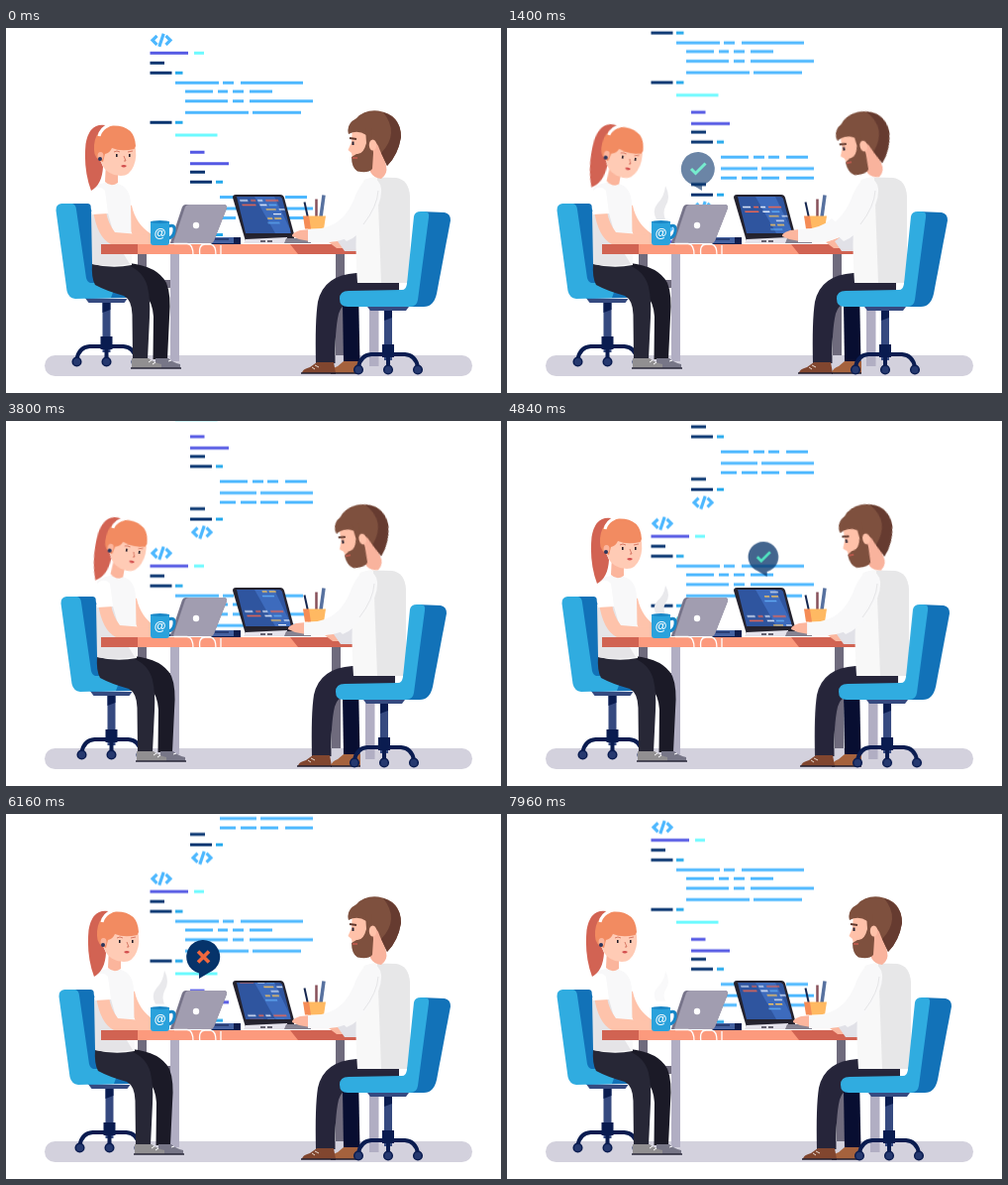
An HTML page without scripts that plays this animation: 500x368 px, repeating every 8000 ms.

```html
<!DOCTYPE html>
<html lang="en">
<head>
<meta charset="utf-8">
<title>Pair programming</title>
<style>
html, body { margin: 0; width: 100%; height: 100%; overflow: hidden; background: #fff; }
svg { display: block; width: 100vw; height: 100vh; }
.code { animation: scroll 8s linear infinite; }
.screen { animation: lines 8s linear infinite; }
.girl { animation: roll 8s ease-in-out infinite; }
.girl-head { transform-origin: 105px 158px; animation: nod 8s ease-in-out infinite; }
.man { animation: lean 8s ease-in-out infinite; }
.man-head { transform-origin: 378px 150px; animation: look 8s ease-in-out infinite; }
.hand { animation: type 8s ease-in-out infinite; }
.steam { transform-origin: 155px 194px; animation: steam 4s linear infinite; }
.pop { animation: pop 8s linear infinite; }
@keyframes scroll { to { transform: translateY(-230.5px); } }
@keyframes lines { to { transform: translateY(38px); } }
@keyframes roll {
  0%, 21.5% { transform: none; }
  37%, 63.5% { transform: translateX(5px); }
  94%, 100% { transform: none; }
}
@keyframes nod {
  0%, 1% { transform: none; }
  13%, 48% { transform: rotate(10deg); }
  58%, 100% { transform: none; }
}
@keyframes lean {
  0%, 11% { transform: none; }
  17%, 53% { transform: translateX(-4px); }
  68%, 100% { transform: none; }
}
@keyframes look {
  0%, 11% { transform: none; }
  17%, 58% { transform: translate(.7px, -1.5px) rotate(-13deg); }
  69%, 100% { transform: none; }
}
@keyframes type {
  0%, 10%, 24%, 47.5%, 60.5%, 77%, 93%, 100% { transform: none; }
  5%, 55%, 68%, 86% { transform: translateX(-4px); }
  17.5% { transform: translateX(-7px); }
  30%, 38% { transform: translateX(-3px); }
}
@keyframes steam {
  0%, 5% { opacity: 0; transform: translateY(4px) scaleY(.7); }
  16% { opacity: 1; }
  35% { transform: none; }
  62% { opacity: 1; transform: translateY(-2px); }
  73%, 96% { opacity: 0; transform: translateY(-4px) scaleY(.9); }
  99% { opacity: .3; }
  100% { opacity: 0; transform: translateY(-4px) scaleY(.9); }
}
@keyframes pop {
  0% { opacity: 0; transform: scale(.6); }
  3%, 11.5% { opacity: 1; transform: none; }
  14%, 100% { opacity: 0; transform: none; }
}
</style>
</head>
<body>
<svg viewBox="0 0 500 368" fill="none">
<defs>
  <clipPath id="air"><path d="M0 0H500V217H0Z"/></clipPath>
  <clipPath id="glass"><path d="M233 170H276Q278 170 279 172L288 207H242Z"/></clipPath>
  <g id="tag" stroke="#4db8ff" stroke-width="3.200">
    <path d="M-4.500 -4.500L-9 0L-4.500 4.500M4.500 -4.500L9 0L4.500 4.500M2.200 -6.500L-2.200 6.500"/>
  </g>
  <g id="block" stroke-width="3">
    <use href="#tag" x="157" y="12.300"/>
    <use href="#tag" x="198" y="221.700"/>
    <path stroke="#5458e4" d="M145.500 25.300H184M186 125.300H200.500M186 136.800H225"/>
    <path stroke="#6cfaff" d="M190 25.300H200M171 108H213.500"/>
    <path stroke="#06336f" d="M145.500 35.200H160M145.500 45.200H167.500M145.500 95.300H167.500M186 145.200H201M186 155.200H208M186 198H201M186 208.500H208"/>
    <path stroke="#25a9ec" d="M171 45.200H178.500M171 95.300H178.500M212 155.200H219M212 208.500H219"/>
    <path stroke="#4db8ff" d="M171 55.200H215M219 55.200H230M237 55.200H300M181 64H209M214 64H224M229 64H240M246 64H269M181 73.700H224M229 73.700H240M246 73.700H310M181 85.300H245M249 85.300H298M216 170.500H244M249 170.500H260M264 170.500H275M282 170.500H304M216 182H253M257 182H310M216 191.600H232M237 191.600H253M257 191.600H275M282 191.600H310"/>
  </g>
  <g id="rows" stroke-width="1.300">
    <path stroke="#e6eefc" d="M236 174H244M254 174H259M255 178.500H262M273 183H279M266 187.500H274"/>
    <path stroke="#f0674f" d="M247 174H252M262 174H275M237 178.500H251"/>
    <path stroke="#f6c35c" d="M260 183H270M259 192H264M266 192H273"/>
    <path stroke="#5fa9f2" d="M264 178.500H272M258 196.500H270"/>
  </g>
  <path id="balloon" fill="#06336a" d="M-4 16.500A17 17 0 1 1 6 16L-4 22Z"/>
  <g id="wrong"><use href="#balloon"/><path stroke="#f2683d" stroke-width="3.600" d="M-5 -5.500L6 5.500M6 -5.500L-5 5.500"/></g>
  <g id="right"><use href="#balloon" transform="scale(-1 1)"/><path stroke="#19dfae" stroke-width="3" d="M-7 0L-2.500 4.500L7.500 -5.500"/></g>
  <g id="base">
    <path fill="#364a80" d="M-21 0H21L18 4H-18ZM-4 4H4V54H-4Z"/>
    <path fill="#0a1c50" d="M-4 4H4V11L-4 14Z"/>
    <path stroke="#0a1c50" stroke-width="4" d="M-30 61Q-28 49 -17 48H17Q28 49 30 61M0 45V62"/>
    <path fill="#0a1c50" d="M-6 38H6V51H-6Z"/>
    <g fill="#26396f" stroke="#0a1c50" stroke-width="1.500"><circle cx="-30" cy="63.500" r="4.300"/><circle cy="63.500" r="4.300"/><circle cx="30" cy="63.500" r="4.300"/></g>
  </g>
</defs>

<rect x="39" y="330" width="432" height="21" rx="10.500" fill="#d3d1dd"/>

<g clip-path="url(#air)">
  <g class="code"><use href="#block"/><use href="#block" y="230.500"/></g>
</g>

<!-- table legs; the right end follows the man -->
<path fill="#6f6b7d" d="M133 228H142V254H167V262H142V330H133Z"/>
<path fill="#b1aec3" d="M166 228H175V336H166Z"/>
<g class="man">
  <path fill="#6f6b7d" d="M333 228H342V330H333Z"/>
  <path fill="#b1aec3" d="M367 228H376.500V341H367Z"/>
</g>

<g class="girl">
  <use href="#base" transform="translate(101.500 273)"/>
  <path fill="#1272b8" d="M66 177H83Q87 178 87 183L90 246L123 256V272L80 273Z"/>
  <path fill="#30ace0" d="M50.500 184Q50 178 56 177H67Q70.500 178 71 183L81 252Q82 256 85 257H104Q110 258 109 264L106 272L70 273Q63 272 61.500 265Z"/>
  <path fill="#1b1a27" d="M100 237H124Q153 240 162 257Q167 269 165 292L163 334H148.500L149 291Q148 276 140 268Z"/>
  <path fill="#272736" d="M87 237H118Q139 244 143 261Q146 274 145 292L143 334H128L127.500 289Q127 274 119 270Q101 265 90 259Q86 252 87 237Z"/>
  <path fill="#777687" d="M151 333H164Q168 337 176 339V343H151Z"/>
  <path fill="#918f91" d="M127 333H144Q149 337 157 339V343H127Z"/>
  <path stroke="#282738" stroke-width="1.500" d="M126 343H158M156 343H177"/>
  <path stroke="#fff" d="M144 337L147 335M148 339L151 337M164 336L167 335"/>
  <path fill="#fec3ab" d="M121 176L127 179Q131 198 147 208V217H134Q121 201 119 183Z"/>
  <path fill="#f8f8f9" d="M87 162Q97 153 113 157Q125 160 126 177L127 239Q107 243 87 238Z"/>
  <path fill="#e5e4e7" d="M86 185L103 187L111 215L125 238Q103 241 87 238Z"/>
  <path fill="#fec3ab" d="M88 184L101 185Q103 197 110 206L147 209V218H106Q92 211 88 184Z"/>
  <path fill="#fff" d="M86 165Q94 157 100 164L103 187L87 188Q84 175 86 165Z"/>
  <g class="girl-head">
    <path fill="#d26353" d="M101 98Q84 95 80.500 117Q78 143 86 164Q97 158 98 140Q91 125 96 109Z"/>
    <path fill="#fbb59c" d="M101 135L113 145V156Q106 161 100 155Z"/>
    <path fill="#ffcbb5" d="M93 117Q112 99 130 117Q133 129 129 139Q125 149 116 149Q101 148 97 137Q91 130 93 117Z"/>
    <path fill="#f28b61" d="M89 123Q88 101 108 98.500Q130 98 131 119L129.500 122Q116 125 107 121Q105 126 100 127L98 135Q89 132 89 123Z"/>
    <path stroke="#fff" stroke-width="3" d="M94 109Q96 101 104 98"/>
    <ellipse cx="95.500" cy="129" rx="3" ry="4" fill="#fbb59c"/>
    <circle cx="95" cy="132" r="2" fill="#28355c"/>
    <path stroke="#ce6652" stroke-width=".8" d="M109 125Q112 123 115 125M123 125L128 124M119 129L121 134H119"/>
    <path fill="#25202b" d="M111 127H112.600V130H111ZM124 127H125.600V130H124Z"/>
    <path fill="#d24d4d" d="M116 139Q119 137 122 139Q119 142 116 139Z"/>
  </g>
</g>

<!-- the man's far leg stays planted -->
<path fill="#080e31" d="M340 279Q342 268 356 264L357.500 337H341Z"/>
<path fill="#a5623d" d="M341 336H358V348H328Q329 343 335 341Z"/>
<path stroke="#201b2b" stroke-width="1.500" d="M328 348H358"/>

<!-- table top -->
<path fill="#fc9a7d" d="M96 218H340V228H96Z"/>
<path fill="#d16352" d="M96 218H133V228H96ZM287 218H345V228H295Z"/>
<path class="man" fill="#d16352" d="M335 218H355V228H335Z"/>

<!-- books and laptops -->
<path fill="#4562a1" d="M207 211H231V218H207Z"/>
<path fill="#101d4c" d="M230 211H237V218H230Z"/>
<path stroke="#101d4c" d="M207 217.500H237M211 213H225"/>
<g transform="translate(.8 0)">
  <path fill="#77748a" d="M165 217L177 181Q178 178 181 178H219Q223 178 222 182L209 215Q208 217 205 217Z"/>
  <path fill="#a19db0" d="M168 217L180 181Q181 178 184 178H219Q223 178 222 182L209 215Q208 217 205 217Z"/>
</g>
<circle cx="192" cy="199" r="3.200" fill="#fff"/>
<path stroke="#fff" stroke-width="1.300" d="M170 217.500H183Q189 218 189 229M196 230Q194 218 201 218H207Q212 219 212 229M217 228V219"/>

<path fill="#24222e" d="M229 171Q229 168 232 168H277Q280 168 281 171L291 208V213L242 215Z"/>
<path fill="#2f559f" d="M233 170H276Q278 170 279 172L288 207H242Z"/>
<path fill="#3d6bbd" d="M251 170H271L287 203V207H272Z"/>
<g clip-path="url(#glass)">
  <g transform="translate(-48 0) skewX(15.500)">
    <g class="screen"><use href="#rows"/><use href="#rows" y="-38"/></g>
  </g>
</g>
<path fill="#e4e2eb" d="M242 213L284 211V217H240Z"/>
<path fill="#858291" d="M283 212H308V217H281Z"/>
<path stroke="#3b3948" stroke-width="1.500" d="M257 215H262M264 215H269"/>

<!-- pencils -->
<g transform="translate(0 .5)">
  <path stroke="#15264f" stroke-width="2" d="M301.500 175L305 191"/>
  <path stroke="#87505a" stroke-width="2.500" d="M313.500 172V190"/>
  <path stroke="#57719f" stroke-width="3.500" d="M321 168L318 190"/>
  <path fill="#ffb962" d="M305 189H323L321 202H305Z"/>
  <path fill="#f58c56" d="M300 189H306L308 202H302Z"/>
</g>

<!-- mug -->
<path class="steam" fill="#e9e9ec" d="M151 193Q146 184 152 177Q159 170 160 159Q166 171 160 180Q157 186 160 193Z"/>
<path stroke="#1687c8" stroke-width="3" d="M164 200Q171 197 170 205Q169 212 163 212"/>
<path fill="#2aa2dc" d="M146 195H165V216Q165 219 162 219H149Q146 219 146 216Z"/>
<ellipse cx="155.500" cy="195.500" rx="9.500" ry="1.500" fill="#1a86c6"/>
<text x="155.500" y="210.500" text-anchor="middle" font-family="Liberation Sans, Arial, sans-serif" font-size="12" font-weight="700" fill="#fff">@</text>

<g class="man">
  <path fill="#fbb8a0" d="M326 216L343 210V222H334Z"/>
  <path fill="#e1e1e7" d="M335 215L354 201V225H342Z"/>
  <path fill="#26253a" d="M397 247H354Q321 249 315 276Q312 295 313 338H332.500Q332 305 336 288Q340 276 352 273H397Z"/>
  <path fill="#81462f" d="M314 337H331L333 348H299Q299 344 307 342Z"/>
  <path stroke="#201b2b" stroke-width="1.500" d="M298 348H333"/>
  <path stroke="#eadbd1" d="M312 340L316 342M309 342L312 344"/>
  <path fill="#f8f8f8" d="M361 154Q368 148 394 151Q407 153 408 170V257H355Q352 217 355 187Z"/>
  <path fill="#e7e7e8" d="M375 151H394Q407 153 408 170V257H379Z"/>
  <use href="#base" transform="translate(386 281)"/>
  <path fill="#1272b8" d="M419 185L443 186Q449 187 449 194L435 268Q432 281 422 281H401Z"/>
  <path fill="#30ace0" d="M412 190Q413 185 419 185H423Q428 185 427 191L416 274Q415 281 408 281H345Q337 281 337 273Q337 265 346 265L400 264Q404 264 405 258Z"/>
  <g class="hand">
    <path fill="#fcb69e" d="M307 203L297 204Q288 207 289 210L296 213L307 215Z"/>
    <path fill="#f8f8f9" d="M305 203Q326 204 339 192L353 205Q342 216 326 216H305Z"/>
  </g>
  <path fill="#f8f8f9" d="M364 153Q377 149 379 162Q380 176 368 193Q357 210 344 215L329 201Q344 190 351 174Q356 159 364 153Z"/>
  <path stroke="#e5e5e7" d="M376 164Q375 180 361 198"/>
  <g class="man-head">
    <path fill="#f9b39d" d="M365 111L379 113L384 139Q386 147 379 152Q371 151 368 145Z"/>
    <path fill="#ffc1a9" d="M350 98L367 97V137H351L349 126L345.500 123L349 115Z"/>
    <path fill="#7e503e" d="M346 107Q343 97 354 91Q362 82 376 83.500Q399 87 399 110Q396 128 385 139L378 124Q375 113 367 113L364 108Q355 102 346 107Z"/>
    <path fill="#663b30" d="M381 85Q399 91 399 110Q396 128 385 139L379 126Q398 106 381 85Z"/>
    <path fill="#7e503e" d="M363 101H369L371 126L370 142Q366 147 355 144.500Q349 141 349 130L354 127Q361 128 364 116Z"/>
    <ellipse cx="370.500" cy="118" rx="3.700" ry="5.500" fill="#ffc1a9"/>
    <path stroke="#60392e" stroke-width="2" d="M347 111L354 112"/>
    <path fill="#282332" d="M349.500 114.500H351.500V118H349.500Z"/>
    <path stroke="#c95b4f" stroke-width="1.500" d="M350 131H355"/>
  </g>
</g>

<g transform="translate(193 142)"><use class="pop" href="#right" style="animation-delay:-7.6s"/></g>
<g transform="translate(281 133)"><use class="pop" href="#wrong" style="animation-delay:-6.24s"/></g>
<g transform="translate(259 137)"><use class="pop" href="#right" style="animation-delay:-3.34s"/></g>
<g transform="translate(199 144)"><use class="pop" href="#wrong" style="animation-delay:-2.32s"/></g>
</svg>
</body>
</html>
```
